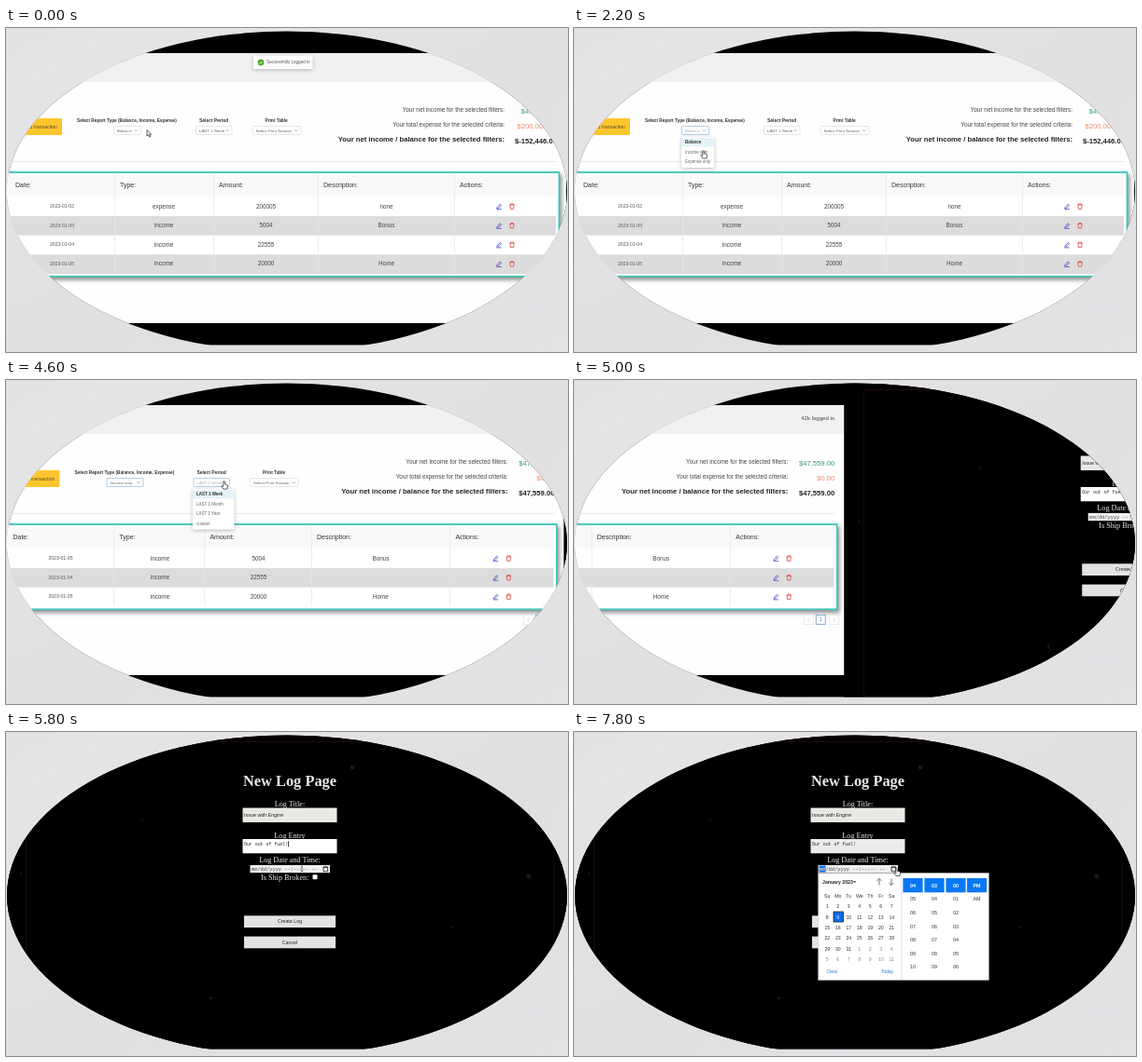
These frames come from a looping animation (602 by 348 pixels, 8000 ms). An HTML page:

```html
<!DOCTYPE html>
<html lang="en">
<head>
<meta charset="utf-8">
<title>Report and log demo</title>
<style>
  html, body { margin: 0; width: 100%; height: 100%; overflow: hidden; background: #e2e2e4; }
  svg { display: block; width: 602px; height: 348px; }
  text { font-family: "Liberation Sans", Arial, sans-serif; white-space: pre; }
  .serif { font-family: "Liberation Serif", Times, serif; }
  .mono { font-family: "Liberation Mono", Courier, monospace; }
  .b { font-weight: bold; }
  .card { filter: drop-shadow(2px 3px 2px rgba(0, 0, 0, .42)); }
  .pop { filter: drop-shadow(0 1px 2px rgba(0, 0, 0, .25)); }
</style>
</head>
<body>
<svg id="stage" viewBox="0 0 602 348">
  <defs>
    <linearGradient id="bg" x1="0" y1="0" x2="1" y2="1">
      <stop offset="0" stop-color="#e1e1e2"/>
      <stop offset=".1" stop-color="#e5e5e6"/>
      <stop offset=".5" stop-color="#e0e0e2"/>
      <stop offset="1" stop-color="#e3e2e5"/>
    </linearGradient>
    <clipPath id="lens"><ellipse cx="301" cy="175.5" rx="300" ry="172"/></clipPath>
    <clipPath id="floor"><rect width="602" height="340.5"/></clipPath>
  </defs>
  <rect width="602" height="348" fill="url(#bg)"/>
  <g clip-path="url(#floor)"><g id="view" clip-path="url(#lens)"></g></g>
</svg>
<script>
const LOOP = 8000;
const NS = "http://www.w3.org/2000/svg";

function add(parent, tag, attrs) {
  const el = document.createElementNS(NS, tag);
  for (const k in attrs) el.setAttribute(k, attrs[k]);
  parent.appendChild(el);
  return el;
}
const group = (p, attrs) => add(p, "g", attrs);
const rect = (p, x, y, width, height, fill, more) =>
  add(p, "rect", { x, y, width, height, fill, ...more });
const path = (p, d, stroke, more) =>
  add(p, "path", { d, stroke, fill: "none", "stroke-width": .8, ...more });

// y is the middle of the line of text
function text(p, x, y, str, size, fill, anchor = "start", cls = "") {
  const el = add(p, "text", {
    x, y: y + size * .35, "font-size": size, fill, "text-anchor": anchor, class: cls
  });
  el.textContent = str;
  return el;
}

const view = document.getElementById("view");
rect(view, 0, 0, 602, 348, "#000");

/* ---------- report page ---------- */
const report = group(view);
rect(report, 0, 27, 601, 290, "#fefefe");
rect(report, 0, 27, 601, 31, "#f1f1f3");
text(report, 590, 41, "42k logged in", 6.05, "#444", "end");
rect(report, 0, 143.2, 590, .8, "#e2e2e2");

rect(report, -4, 97, 64, 18, "#fdc62f", { rx: 1 });
text(report, 55, 106.3, "Add transaction", 5.2, "#5a4a20", "end");

text(report, 76, 99.5, "Select Report Type (Balance, Income, Expense)", 4.75, "#333", "start", "b");
text(report, 207, 99.5, "Select Period", 4.95, "#333", "start", "b");
text(report, 277.5, 99.5, "Print Table", 4.75, "#333", "start", "b");

function select(x, width, label, stroke = "#ddd", fill = "#666") {
  const g = group(report);
  rect(g, x, 105.5, width, 9, "#fff", { stroke, "stroke-width": .7, rx: 1 });
  text(g, x + 3.5, 110.2, label, 4.4, fill);
  const cx = x + width - 5;
  path(g, `M${cx - 2} 109l2 2.2l2-2.2`, "#999", { "stroke-width": .6 });
  return g;
}
const typeIdle = select(115.5, 29, "Balance");
const typeOpen = select(115.5, 29, "Balance", "#8fbbe0", "#aaa");
const typeDone = select(110.5, 39, "Income only", "#8fbbe0");
const spanIdle = select(203.5, 38.5, "LAST 1 Week");
const spanOpen = select(203.5, 38.5, "LAST 1 Week", "#8fbbe0", "#aaa");
select(264, 52, "Select Print Season");

function summary(labelEnd, expense, balance) {
  const g = group(report);
  text(g, labelEnd, 87.6, "Your net income for the selected filters:", 6.33, "#444", "end");
  text(g, labelEnd, 103.6, "Your total expense for the selected criteria:", 6.33, "#444", "end");
  text(g, labelEnd, 119.8, "Your net income / balance for the selected filters:", 7.65, "#222", "end", "b");
  text(g, 590, 89, "$47,559.00", 7.65, "#2f9c88", "end");
  text(g, 590, 105, expense, 7.65, "#f08a6c", "end");
  text(g, 590, 121.5, balance, 7.65, "#222", "end", "b");
  return g;
}

function table(g, cols, mids, rows) {
  const [type, amount, desc, act] = cols;
  const ROW = 20.6, top = 181.5, bottom = top + rows.length * ROW + 3;
  rect(g, -1, 155, 593.5, bottom - 155, "#fff", { stroke: "#3fc4b8", "stroke-width": 1.8, class: "card" });
  rect(g, 0, 156, 589, 25.5, "#f9f9fb");
  rows.forEach((r, i) => {
    const y = top + i * ROW, mid = y + 9.8;
    if (i % 2) rect(g, 0, y, 589, ROW, "#dcdcdc");
    text(g, mids[0], mid, r[0], 5.1, "#555", "middle");
    for (let c = 1; c < 4; c++) text(g, mids[c], mid, r[c], 6.33, "#444", "middle");
    icons(g, mids[4], mid + .3);
  });
  for (const x of cols) rect(g, x, 158, .7, bottom - 162, "#e6e6e8");
  ["Date:", "Type:", "Amount:", "Description:", "Actions:"].forEach((h, i) =>
    text(g, i ? cols[i - 1] + 6 : 10, 169, h, 7, "#333"));
  const py = bottom + 11;
  for (const x of [557, 570, 584.5]) {
    rect(g, x, py - 5, 10, 10, "#fff", { stroke: x === 570 ? "#6f93b8" : "#e4e4e6", "stroke-width": .8 });
  }
  path(g, `M563 ${py - 2}l-2 2l2 2M588.5 ${py - 2}l2 2l-2 2`, "#bbb", { "stroke-width": .6 });
  text(g, 575, py, "1", 5, "#3f78b5", "middle");
}

function icons(g, x, y) {
  path(g, `M${x - 2} ${y + 1.2}l3.2-3.6l1.3 1.1l-3.2 3.4l-1.5.2zM${x - 2.6} ${y + 3.1}h5.4`, "#4444cc");
  const t = x + 14;
  path(g, `M${t - 2.8} ${y - 1.7}h5.6M${t - 1.2} ${y - 1.9}v-.9h2.4v.9M${t - 2} ${y - 1.5}l.3 4.3h3.4l.3-4.3`, "#e0443e");
}

const income = [
  ["2023-01-05", "income", "5004", "Bonus"],
  ["2023-01-04", "income", "22555", ""],
  ["2023-01-05", "income", "20000", "Home"]
];
const allData = summary(534, "$200,005.00", "$-152,446.00");
table(allData, [116, 222, 334, 480], [60, 169, 278.5, 407.5, 528],
  [["2023-01-02", "expense", "200005", "none"], ...income]);
const incomeData = summary(540, "$0.00", "$47,559.00");
table(incomeData, [118, 215, 329.5, 478], [61, 167.5, 273, 404, 527], income);

function menu(x, width, items) {
  const g = group(report);
  rect(g, x, 117, width, items.length * 10.5 + 1.5, "#fff", { class: "pop", rx: 1 });
  rect(g, x, 118, width, 9.5, "#e3f4f8");
  items.forEach((s, i) =>
    text(g, x + 4, 122.8 + i * 10.4, s, 4.5, i ? "#666" : "#333", "start", i ? "" : "b"));
  return g;
}
const typeMenu = menu(115, 35, ["Balance", "Income only", "Expense only"]);
const spanMenu = menu(202.5, 44.5, ["LAST 1 Week", "LAST 1 Month", "LAST 1 Year", "custom"]);

const toast = group(report);
rect(toast, 265, 29.5, 63.5, 14.5, "#fff", { class: "pop", rx: 1 });
add(toast, "circle", { cx: 273, cy: 37, r: 3.4, fill: "#4caf2f" });
path(toast, "M271.5 37l1.1 1.2l2-2.2", "#fff");
text(toast, 279, 36.8, "Successfully Logged in", 4.55, "#555");

/* ---------- log page ---------- */
const log = group(view);
rect(log, 0, 0, 602, 348, "#000");
rect(log, 21.5, 10.5, 565.5, 329, "none", { stroke: "#22091a", "stroke-width": .8 });
[[16, 152, 1], [371, 38, 2.2], [560, 155, 2.6], [219, 286, 1.4], [146, 95, 1.2], [477, 210, 1]]
  .forEach(([cx, cy, r]) => add(log, "circle", { cx, cy, r, fill: "#1b1b1d" }));

const heading = (y, s, size = 8.2, cls = "serif") => text(log, 304, y, s, size, "#e8e8e8", "middle", cls);
heading(52.2, "New Log Page", 16.4, "serif b");
heading(76.8, "Log Title:");
heading(111, "Log Entry");
heading(137, "Log Date and Time:");
text(log, 273, 156, "Is Ship Broken:", 8.2, "#e8e8e8", "start", "serif");
rect(log, 328.5, 153.2, 5, 5, "#fff", { rx: 1 });

rect(log, 253.5, 81.5, 101, 15.5, "#e9e9e6");
text(log, 255, 89.3, "Issue with Engine", 5.4, "#222");
const entry = rect(log, 253.5, 115, 101, 15.3, "#fff");
text(log, 255, 120.3, "Our out of fuel!", 4.9, "#222", "start", "mono");
const caret = rect(log, 302.2, 117.3, .8, 6, "#111");

rect(log, 261.5, 143, 85.5, 8.2, "#efefef");
const fieldMark = rect(log, 262.5, 143.6, 7, 7, "#0a6cf0");
text(log, 263, 147, "mm/dd/yyyy --:--:-- --", 5.35, "#444", "start", "mono");
const fieldLit = text(log, 263, 147, "mm", 5.35, "#fff", "start", "mono");
path(log, "M340 144.8h4.6v5h-4.6zM340 145.6h4.6", "#222");

[[197.3, "Create Log"], [219.6, "Cancel"]].forEach(([y, s]) => {
  rect(log, 255, y, 98, 12.7, "#e3e3e3");
  text(log, 304, y + 6.3, s, 5.3, "#222", "middle");
});

const picker = group(log);
rect(picker, 261.7, 151.5, 182.6, 115, "#fff", { stroke: "#bbb", "stroke-width": .5 });
rect(picker, 350.5, 152, .7, 114, "#ddd");
text(picker, 266, 161, "January 2023", 5.2, "#222", "start", "b");
add(picker, "path", { d: "M299 160.2h3.2l-1.6 2z", fill: "#333" });
path(picker, "M327 164.5v-7M324.4 160l2.6-2.6l2.6 2.6M340 157.5v7M337.4 162l2.6 2.6l2.6-2.6", "#555");
const colX = i => 271.3 + i * 11.5;
["Su", "Mo", "Tu", "We", "Th", "Fr", "Sa"].forEach((d, i) =>
  text(picker, colX(i), 176.3, d, 5.2, "#333", "middle"));
rect(picker, 278, 193, 10.5, 11, "#0a6cf0", { stroke: "#222", "stroke-width": .8 });
for (let i = 0; i < 42; i++) {
  const day = i < 31 ? i + 1 : i - 30;
  const fill = i === 8 ? "#fff" : i < 31 ? "#333" : "#888";
  text(picker, colX(i % 7), 187.3 + Math.floor(i / 7) * 11.4, day, 5.2, fill, "middle");
}
text(picker, 270.5, 257.5, "Clear", 5, "#2a7ad8");
text(picker, 342, 257.5, "Today", 5, "#2a7ad8", "end");
[[363, 4, 7], [386, 3, 7], [409, 0, 7], [431.5, "PM", 2]].forEach(([x, first, count]) => {
  rect(picker, x - 10.6, 157, 21.2, 15.3, "#0a78f5");
  for (let i = 0; i < count; i++) {
    const s = first === "PM" ? ["PM", "AM"][i] : String(first + i).padStart(2, "0");
    text(picker, x, 165 + i * 14.6, s, 5.3, i ? "#333" : "#fff", "middle", i ? "" : "b");
  }
});

/* ---------- pointers ---------- */
const ARROW = "M0 0v6.6l1.6-1.4l1.2 2.5l1-.5l-1.2-2.4h2z";
const HAND = "M-.7 0q.8-.8 1.5 0v2.8l2.6.7q.9.4.6 1.6l-.6 3h-4l-2.2-3q.3-1.2 1.3-.5l.8.7z";
const pointer = (p, d) => path(p, d, "#222", { fill: "#fff", "stroke-width": .7 });
const arrow = pointer(report, ARROW);
const hand = pointer(report, HAND);
const beam = path(log, "M-1 -2.6h2M0 -2.6v5.2M-1 2.6h2", "#333", { "stroke-width": .6 });
const logHand = pointer(log, HAND);

/* ---------- timeline ---------- */
const MOUSE = [[0, 151, 109.5], [950, 151, 109.5], [1250, 137, 109.5], [1600, 137, 110], [2100, 138.5, 132],
  [3200, 138.5, 132], [3750, 214, 116.5], [3900, 214, 116.5], [4200, 236, 109], [LOOP, 236, 109]];
const LOG_MOUSE = [[0, 317, 147], [5850, 317, 147], [6350, 345.5, 146.5], [LOOP, 345.5, 146.5]];

const clamp = v => Math.min(1, Math.max(0, v));
const ramp = (t, from, to) => clamp((t - from) / (to - from));
const smooth = u => u * u * (3 - 2 * u);
const cubic = u => u < .5 ? 4 * u ** 3 : 1 - 4 * (1 - u) ** 3;

function along(steps, t) {
  const i = steps.findIndex(s => s[0] > t);
  const [t0, x0, y0] = steps[i - 1], [t1, x1, y1] = steps[i];
  const u = smooth(ramp(t, t0, t1));
  return `translate(${x0 + (x1 - x0) * u} ${y0 + (y1 - y0) * u})`;
}
const show = (el, on) => el.setAttribute("visibility", on ? "visible" : "hidden");
const fade = (el, v) => el.setAttribute("opacity", v);
const move = (el, v) => el.setAttribute("transform", v);

function draw(t) {
  const shift = -600 * cubic(ramp(t, 4500, 5490));
  move(report, `translate(${shift} 0)`);
  move(log, `translate(${600 + shift} 0)`);

  const gone = ramp(t, 80, 320);
  fade(toast, 1 - gone);
  move(toast, `translate(0 ${-3 * gone})`);

  show(typeIdle, t < 1400);
  show(typeOpen, t >= 1400 && t < 2550);
  show(typeDone, t >= 2550);
  fade(typeMenu, ramp(t, 1400, 1550) - ramp(t, 2550, 2700));
  show(allData, t < 2700);
  show(incomeData, t >= 2700);
  show(spanIdle, t < 4250);
  show(spanOpen, t >= 4250);
  fade(spanMenu, ramp(t, 4250, 4400));

  show(arrow, t < 1150);
  show(hand, t >= 1150);
  move(arrow, along(MOUSE, t));
  move(hand, along(MOUSE, t));

  const picking = t >= 6600;
  entry.setAttribute("fill", picking ? "#ebebee" : "#fff");
  show(caret, !picking && t % 1000 < 950);
  show(fieldMark, picking);
  show(fieldLit, picking);
  show(picker, picking);
  show(beam, t < 6150);
  show(logHand, t >= 6150);
  move(beam, along(LOG_MOUSE, t));
  move(logHand, along(LOG_MOUSE, t));
}

const start = performance.now();
function tick() {
  draw((performance.now() - start) % LOOP);
  requestAnimationFrame(tick);
}
tick();
</script>
</body>
</html>
```
